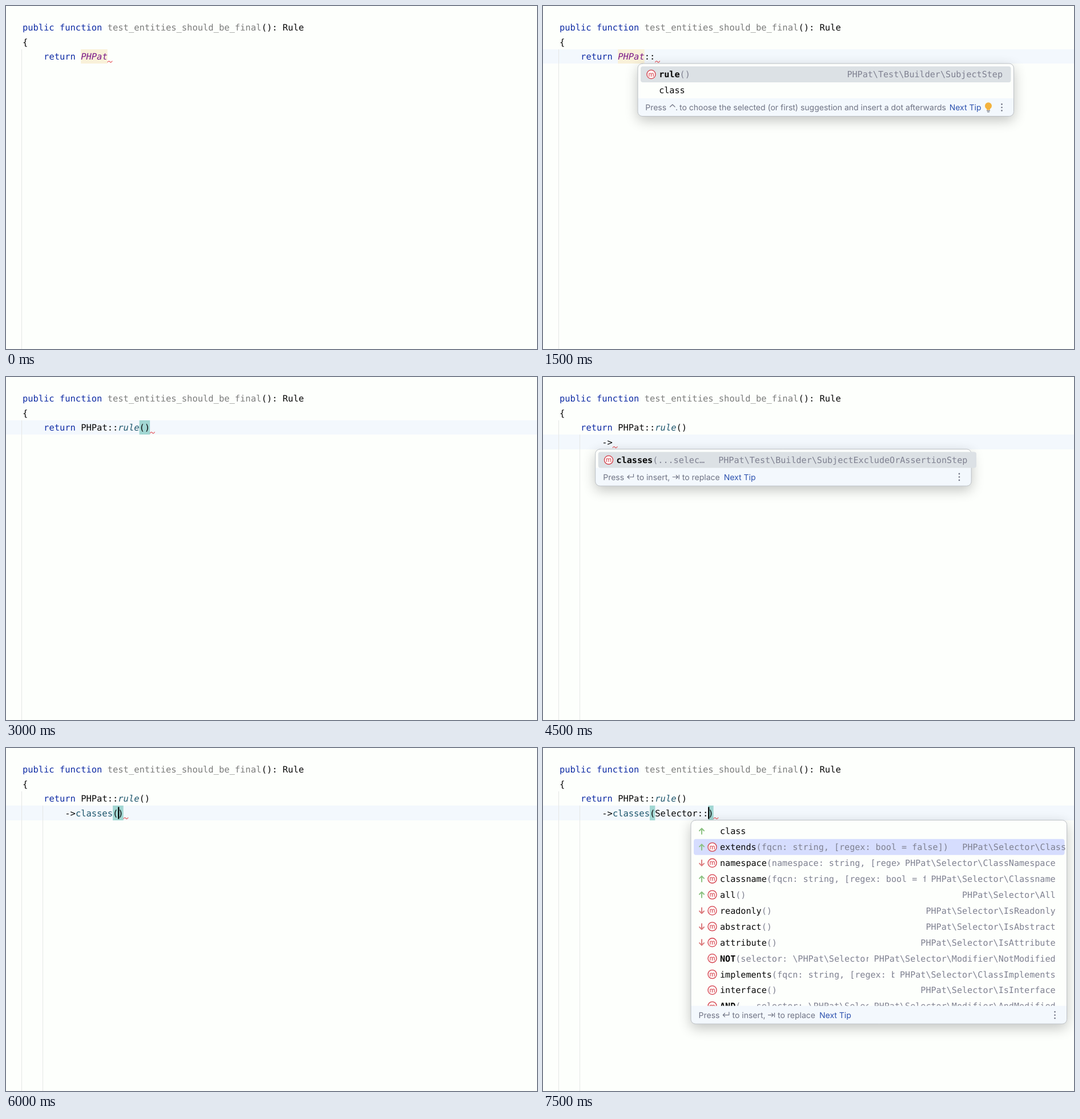
Recreate the animation shown at these times as an HTML page with a canvas. Size 930x602 px, loop 8 s.

```html
<!DOCTYPE html>
<html lang="en">
<head>
<meta charset="utf-8">
<title>Code completion</title>
<style>
  html, body { margin: 0; width: 100%; height: 100%; overflow: hidden; background: #fdfffc; }
  canvas { display: block; width: 930px; height: 602px; }
</style>
</head>
<body>
<canvas id="stage" width="930" height="602"></canvas>
<script>
const ctx = document.getElementById('stage').getContext('2d');
const MONO = '"DejaVu Sans Mono", monospace';
const SANS = 'Inter, sans-serif';
const CODE_FONT = `15.45px ${MONO}`;
const ITEM_FONT = `15.1px ${MONO}`;
const TIP_FONT = `14px ${SANS}`;
const LEFT = 28.9, CELL = 9.3;
const STEP = 1500, LOOP = 8000;
const C = {
  bg: '#fdfffc', row: '#f3f8fd', guide: '#e5e7e6', text: '#080808', keyword: '#0f2ca5',
  unused: '#7b7c7b', constant: '#7b1a8a', method: '#1d566c', found: '#f9f1d9',
  brace: '#a2d7d3', error: '#e5484d', hint: '#7f8191', tip: '#6f7384', link: '#2c51ae',
  idle: '#dce1e5', active: '#d6ddfe', icon: '#d23c48', up: '#8cc282', down: '#dc7c7e'
};

const colX = col => LEFT + col * CELL;
const rowTop = row => 24.8 + row * 25.5;

function text(str, x, y, color, font, align = 'left') {
  ctx.font = font;
  ctx.fillStyle = color;
  ctx.textAlign = align;
  ctx.fillText(str, x, y);
}

function rect(x, y, w, h, color) {
  ctx.fillStyle = color;
  ctx.fillRect(x, y, w, h);
}

function rounded(x, y, w, h, r) {
  ctx.beginPath();
  ctx.roundRect(x, y, w, h, r);
}

function stroke(points, color, width) {
  ctx.beginPath();
  points.forEach(([x, y], i) => i ? ctx.lineTo(x, y) : ctx.moveTo(x, y));
  ctx.strokeStyle = color;
  ctx.lineWidth = width;
  ctx.stroke();
}

function disc(x, y, r, color) {
  ctx.beginPath();
  ctx.arc(x, y, r, 0, Math.PI * 2);
  ctx.fillStyle = color;
  ctx.fill();
}

function clipped(x, y, w, h, draw) {
  ctx.save();
  ctx.beginPath();
  ctx.rect(x, y, w, h);
  ctx.clip();
  draw();
  ctx.restore();
}

// Editor

function code(row, col, str, color, italic) {
  text(str, colX(col), 43.2 + row * 25.5, color, (italic ? 'italic ' : '') + CODE_FONT);
}

function cells(row, col, count, color) {
  const y = Math.round(rowTop(row));
  rect(colX(col), y, count * CELL, Math.round(rowTop(row + 1)) - y, color);
}

function caretRow(row) {
  const y = Math.round(rowTop(row));
  rect(0, y, 930, Math.round(rowTop(row + 1)) - y, C.row);
}

function guide(x, row) {
  const y = Math.round(rowTop(row));
  rect(x, y, 1, 602 - y, C.guide);
}

function squiggle(row, col) {
  const x = colX(col), y = rowTop(row) + 21.7;
  ctx.beginPath();
  ctx.moveTo(x + 0.3, y + 1.1);
  ctx.quadraticCurveTo(x + 2.2, y - 2.2, x + 4.2, y + 0.3);
  ctx.quadraticCurveTo(x + 6.2, y + 2.8, x + 8.2, y - 0.7);
  ctx.strokeStyle = C.error;
  ctx.lineWidth = 1.1;
  ctx.stroke();
}

function caret(row, col) {
  rect(colX(col) - 0.2, rowTop(row) + 2.2, 2.2, 21, '#000');
}

function header() {
  code(0, 0, 'public function', C.keyword);
  code(0, 16, 'test_entities_should_be_final', C.unused);
  code(0, 45, '(): Rule', C.text);
  code(1, 0, '{', C.text);
  code(2, 4, 'return', C.keyword);
}

function constantName() {
  cells(2, 11, 5, C.found);
  guide(27, 2);
  header();
  code(2, 11, 'PHPat', C.constant, true);
}

function ruleCall() {
  header();
  code(2, 11, 'PHPat::', C.text);
  code(2, 18, 'rule', C.method, true);
  code(2, 22, '()', C.text);
}

function chain() {
  caretRow(3);
  guide(27, 2);
  guide(64, 3);
  ruleCall();
  code(3, 8, '->', C.text);
}

// Completion popup

function popup(x, y, w, h, footY) {
  ctx.save();
  ctx.shadowColor = 'rgba(0,0,0,.24)';
  ctx.shadowBlur = 22;
  ctx.shadowOffsetY = 7;
  rounded(x, y, w, h, 8);
  ctx.fillStyle = C.bg;
  ctx.fill();
  ctx.restore();
  clipped(x, footY, w, h, () => {
    rounded(x, y, w, h, 8);
    ctx.fillStyle = C.row;
    ctx.fill();
  });
  rounded(x, y, w, h, 8);
  ctx.strokeStyle = '#bcc0c5';
  ctx.lineWidth = 1;
  ctx.stroke();
}

function selection(x, y, w, color) {
  rounded(x, y, w, 28, 4);
  ctx.fillStyle = color;
  ctx.fill();
}

function methodIcon(x, y) {
  disc(x, y, 8.2, C.icon);
  disc(x, y, 6.9, '#fff5f4');
  text('m', x, y + 3.6, C.icon, `11.5px ${SANS}`, 'center');
}

function item(x, y, name, params, bold) {
  const font = (bold ? 'bold ' : '') + ITEM_FONT;
  text(name, x, y + 5.4, C.text, font);
  const end = x + ctx.measureText(name).width;
  text(params, end, y + 5.4, C.hint, ITEM_FONT);
}

function kebab(x, y) {
  for (const d of [-5.6, 0, 5.6]) disc(x, y + d, 1.3, C.tip);
}

function tip(str, x, y, color = C.tip) {
  text(str, x, y + 5, color, TIP_FONT);
}

function keyTip(x, y) {
  tip('Press', x, y);
  const r = x + 42, t = x + 122;
  stroke([[r + 11.3, y - 5], [r + 11.3, y], [r + 1, y]], C.tip, 1.2);
  stroke([[r + 4, y - 3.2], [r + 0.8, y], [r + 4, y + 3.2]], C.tip, 1.2);
  stroke([[t, y], [t + 9, y]], C.tip, 1.2);
  stroke([[t + 6, y - 3], [t + 9, y], [t + 6, y + 3]], C.tip, 1.2);
  stroke([[t + 11, y - 3.5], [t + 11, y + 3.5]], C.tip, 1.2);
  tip('to insert,', x + 59, y);
  tip('to replace', x + 138.5, y);
  tip('Next Tip', x + 211.5, y, C.link);
}

function bulb(x, y) {
  disc(x, y - 2, 6, '#f3b23d');
  rect(x - 3, y + 1, 6, 4.2, '#f3b23d');
  rect(x - 3, y + 5.8, 6, 1.2, '#777b88');
  rect(x - 2, y + 8, 4, 1.2, '#777b88');
}

function arrow(x, y, dir) {
  const color = dir > 0 ? C.up : C.down;
  stroke([[x, y + 5 * dir], [x, y - 4.5 * dir]], color, 2);
  stroke([[x - 4, y - 0.8 * dir], [x, y - 4.8 * dir], [x + 4, y - 0.8 * dir]], color, 2);
}

// name, parameters, returned class, sort direction
const ITEMS = [
  ['class', '', '', 1],
  ['extends', '(fqcn: string, [regex: bool = false])', 'ClassExtends', 1],
  ['namespace', '(namespace: string, [regex: bool = false])', 'ClassNamespace', -1],
  ['classname', '(fqcn: string, [regex: bool = false])', 'Classname', 1],
  ['all', '()', 'All', 1],
  ['readonly', '()', 'IsReadonly', -1],
  ['abstract', '()', 'IsAbstract', -1],
  ['attribute', '()', 'IsAttribute', -1],
  ['NOT', '(selector: \\PHPat\\Selector\\Item)', 'Modifier\\NotModified', 0],
  ['implements', '(fqcn: string, [regex: bool = false])', 'ClassImplements', 0],
  ['interface', '()', 'IsInterface', 0],
  ['AND', '(...selector: \\PHPat\\Selector\\Item)', 'Modifier\\AndModified', 0]
];

function selectorItem([name, params, type, dir], i) {
  const y = 146 + i * 27.9;
  const chosen = i === 1;
  if (chosen) selection(264, y - 14.2, 649.5, C.active);
  if (dir) arrow(278, y, dir);
  if (type) methodIcon(296.5, y);
  const full = type && 'PHPat\\Selector\\' + type;
  ctx.font = ITEM_FONT;
  const typeX = chosen ? 734.3 : 897.6 - ctx.measureText(full).width;
  clipped(300, y - 14, typeX - 309.5, 28, () =>
    item(310, y, name, params, name === name.toUpperCase()));
  text(full, typeX, y + 5.4, C.hint, ITEM_FONT);
}

// Scenes

const scenes = [
  () => {
    constantName();
    squiggle(2, 16);
  },
  () => {
    caretRow(2);
    constantName();
    code(2, 16, '::', C.text);
    squiggle(2, 18);
    popup(166, 101, 658.5, 92.5, 162);
    selection(171, 106, 648.5, C.idle);
    methodIcon(189.5, 120);
    item(203.2, 120, 'rule', '()', true);
    text('PHPat\\Test\\Builder\\SubjectStep', 805, 125.4, C.hint, ITEM_FONT, 'right');
    item(203.2, 148, 'class', '');
    tip('Press', 179.2, 178);
    stroke([[222.5, 177], [226.8, 173], [231, 177]], C.tip, 1.2);
    tip('.', 232, 178);
    tip('to choose the selected (or first) suggestion and insert a dot afterwards', 239, 178);
    tip('Next Tip', 711.7, 178, C.link);
    bulb(780, 177.3);
    kebab(803.5, 178);
  },
  () => {
    caretRow(2);
    cells(2, 22, 2, C.brace);
    guide(27, 2);
    ruleCall();
    squiggle(2, 24);
  },
  () => {
    chain();
    squiggle(3, 10);
    popup(91.7, 126.7, 658.5, 64.5, 159.5);
    selection(96.7, 131.5, 662.3, C.idle);
    methodIcon(115, 145.7);
    item(128.6, 145.7, 'classes', '(...selec…', true);
    text('PHPat\\Test\\Builder\\SubjectExcludeOrAssertionStep', 307.2, 151.1, C.hint, ITEM_FONT);
    keyTip(105.2, 175.5);
    kebab(729, 175.5);
  },
  () => {
    chain();
    cells(3, 17, 2, C.brace);
    code(3, 10, 'classes', C.method);
    code(3, 17, '()', C.text);
    caret(3, 18);
    squiggle(3, 19);
  },
  () => {
    chain();
    cells(3, 17, 1, C.brace);
    cells(3, 28, 1, C.brace);
    code(3, 10, 'classes', C.method);
    code(3, 17, '(Selector::)', C.text);
    caret(3, 28);
    squiggle(3, 29);
    popup(259, 126.7, 658.5, 357.5, 452.5);
    clipped(260, 128, 656, 324.5, () => ITEMS.forEach(selectorItem));
    keyTip(272.5, 468.7);
    kebab(896.5, 468.7);
  }
];

function draw(now) {
  ctx.textRendering = 'geometricPrecision';
  ctx.lineCap = 'round';
  ctx.lineJoin = 'round';
  rect(0, 0, 930, 602, C.bg);
  scenes[Math.floor((now % LOOP) / STEP)]();
}

const start = performance.now();
function tick() {
  draw(performance.now() - start);
  requestAnimationFrame(tick);
}
tick();
</script>
</body>
</html>
```
